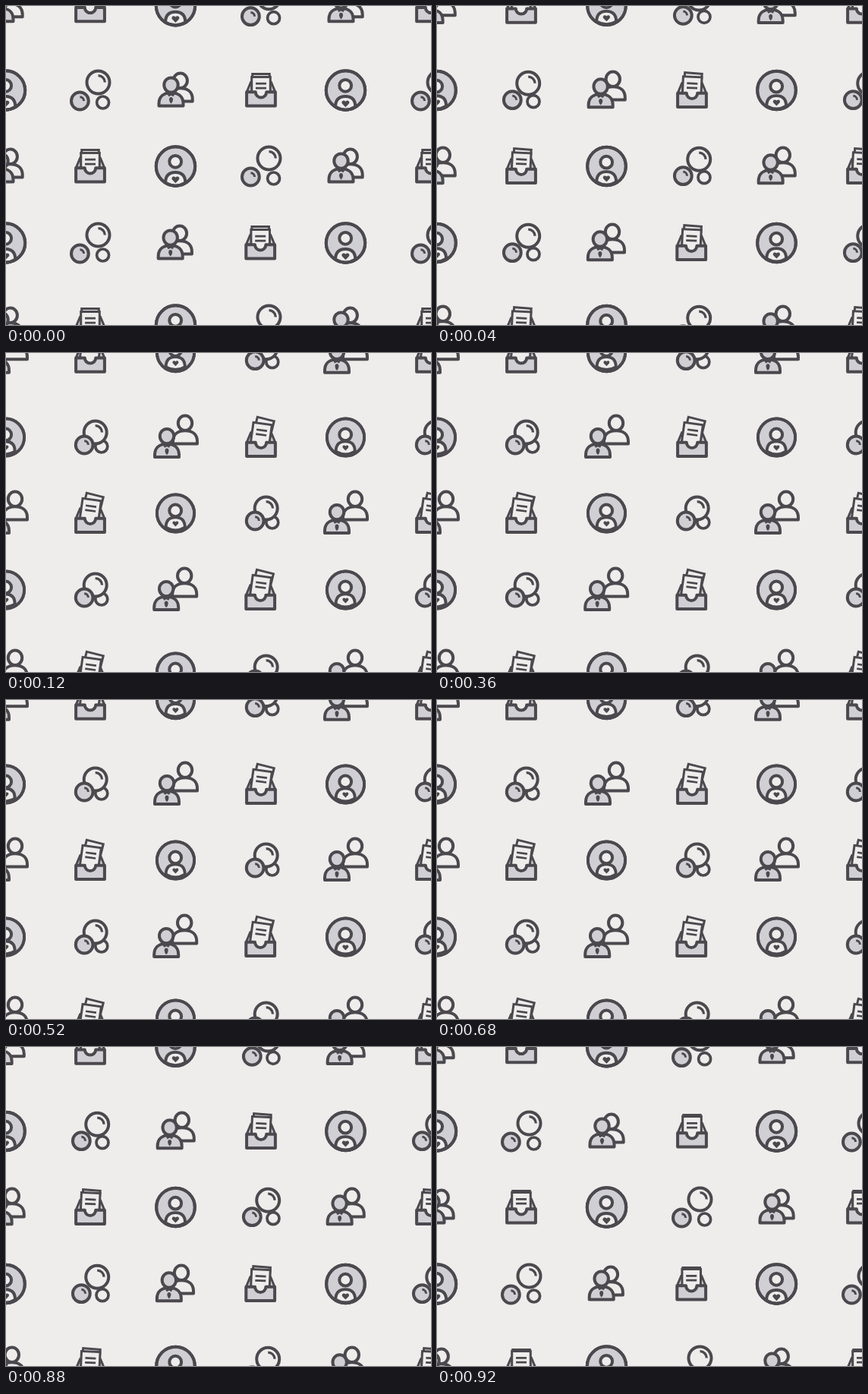
These frames come from a looping animation (560 by 420 pixels, 1600 ms). An HTML page:

```html
<!DOCTYPE html>
<html lang="en">
<head>
<meta charset="utf-8">
<title>Icon pattern</title>
<style>
  html, body { margin: 0; width: 100%; height: 100%; overflow: hidden; background: #eeedeb; }
  svg { display: block; width: 560px; height: 420px; }
  .ink { fill: #4b494e; stroke: none; }
  .grey { fill: #d0cfd4; }
  .pale { fill: #eeedeb; }
  .line { fill: none; }
</style>
</head>
<body>
<svg viewBox="0 0 560 420">
  <defs>
    <path id="shoulders" d="M-16-2V-5C-16-14-10-19.3 0-19.3S16-14 16-5V-2Z"/>
    <ellipse id="head" cy="-29.4" rx="9.2" ry="9.7"/>

    <g id="badge">
      <g id="disc">
        <circle class="grey" r="25.7"/>
      </g>
      <g id="torso">
        <path class="pale" d="M-13.4 21.8C-13.4 12-8 8-.3 8S12.8 12 12.8 21.8Q0 29.5-13.4 21.8Z"/>
        <path id="heart" class="ink" d="M0 5.2L-4.3 .8C-6.6-2-2.6-5.4 0-2.3C2.6-5.4 6.6-2 4.3 .8Z"/>
      </g>
      <circle id="face" class="pale" r="7.9"/>
      <circle id="rim" class="line" r="25.7"/>
    </g>

    <g id="bubbles">
      <circle id="small" class="pale" r="8" stroke-width="3.7"/>
      <g id="large">
        <circle class="pale" r="15"/>
        <path class="line" d="M0-8.8A8.8 8.8 0 0 1 8.8 0" stroke-width="3.3"/>
      </g>
      <g id="medium">
        <circle class="grey" r="11.4"/>
        <path class="line" d="M0-5.3A5.4 5.4 0 0 1 5.2 0" stroke-width="3"/>
      </g>
    </g>

    <g id="people">
      <g id="back" class="pale">
        <use href="#shoulders"/>
        <use href="#head"/>
      </g>
      <g id="front" class="grey">
        <use href="#shoulders"/>
        <path class="ink" d="M-5.5-18.5H5.5L3-14.2L0-15.8L-3-14.2Z"/>
        <path class="ink" d="M0-13.4Q2.6-13 2.5-10Q2.4-7 0-4.8Q-2.4-7-2.5-10Q-2.6-13 0-13.4Z"/>
        <use href="#head"/>
      </g>
    </g>

    <g id="box">
      <path id="rear" class="grey" d="M-18.7 2L-13.3-11H13.3L18.7 2Z" stroke-width="3"/>
      <g id="sheet2">
        <path class="pale" d="M-11.3 31V0H11.3V31Z" stroke-width="3" stroke-linejoin="miter"/>
      </g>
      <g id="sheet1">
        <path class="pale" d="M-12.3 35V0H12.3V35Z" stroke-width="3" stroke-linejoin="miter"/>
        <path class="line" d="M-7 8.7H7M-7 14.6H7" stroke-width="2.7"/>
      </g>
      <path id="tray" class="grey" d="M-18.9 2.2H-7.2A7.2 7.2 0 0 0 7.2 2.2H18.9V20.6H-18.9Z"/>
    </g>
  </defs>
  <g id="pattern" stroke="#4b494e" stroke-width="4" stroke-linejoin="round"></g>
</svg>
<script>
const LOOP = 1600, STEP = 40, MOVE = 120;
const icons = ['badge', 'bubbles', 'people', 'box'];
const columns = [0, 111, 224, 336, 448, 560];
const rows = [-0.3, 111, 211, 312, 420];
const $ = id => document.getElementById(id);

$('pattern').innerHTML = rows.map((y, r) => columns.map((x, c) => {
  const icon = icons[(c + (r % 2 ? 0 : 2)) % 4];
  const nudge = icon === 'badge' ? -0.5 : r === 3 && icon !== 'bubbles' ? -0.8 : 0;
  return `<use href="#${icon}" x="${x + nudge}" y="${y}"/>`;
}).join('')).join('');

const mix = (a, b, p) => a + (b - a) * p;
const clamp = v => Math.max(0, Math.min(1, v));
const set = (id, value) => $(id).setAttribute('transform', value);
const move = (id, x0, y0, x1, y1, p, extra = '') =>
  set(id, `translate(${mix(x0, x1, p)} ${mix(y0, y1, p)}) ${extra}`);

function draw(time) {
  const t = Math.floor(time / STEP) * STEP;
  const closing = t >= 800;
  const p = closing ? clamp(1 - (t - 800) / MOVE) : clamp(t / MOVE);

  const shrink = `scale(${mix(1, 0.957, p)})`;
  set('disc', shrink);
  set('rim', shrink);
  move('torso', 0, 0, 0, -2.2, p, shrink);
  move('heart', -0.1, 17, -0.1, 16.2, p, `scale(${mix(1, 0.83, p)})`);
  move('face', -0.3, -6.2, -0.3, -3.6, p);

  move('large', 10.5, -10.5, 6.7, -6.5, p);
  move('medium', -13.6, 14, -7.8, 10, p);
  move('small', 16.6, 16, 14.8, 12, p);

  move('front', -6.5, 22.5, -12, 28, p);
  move('back', 5.7, 16.6, 12, 10.6, p);

  move('rear', 0, 0, 0, 4.5, p);
  move('tray', 0, 0, 0, 4.5, p);
  const reach = mix(closing ? 29.4 : 27.5, 28.2, p);
  set('sheet1', `translate(${-1.7 * p} 10) rotate(${8 * p}) translate(0 ${-reach})`);
  set('sheet2', `translate(${-2.2 * p} 10) rotate(${14 * p}) translate(0 ${-mix(31.5, 35, p)})`);
}

const start = performance.now();
function tick() {
  draw((performance.now() - start) % LOOP);
  requestAnimationFrame(tick);
}
draw(0);
requestAnimationFrame(tick);
</script>
</body>
</html>
```
